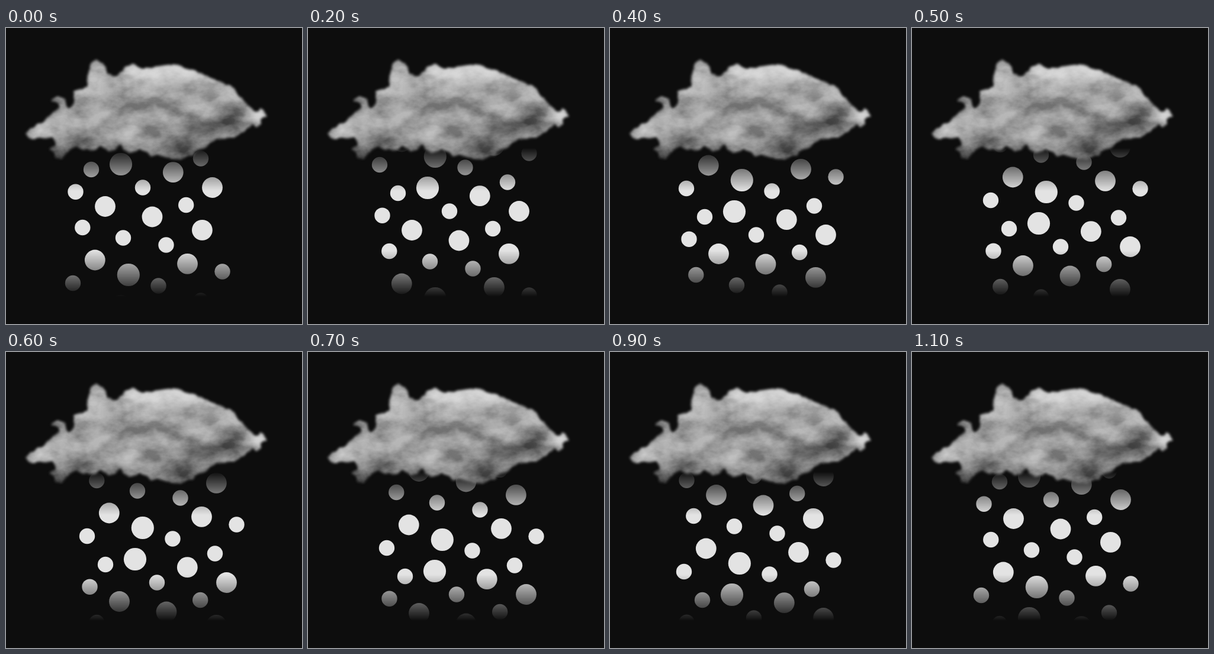
Write an HTML page that moves like this. It is 500x500 px and loops after 1200 ms.

```html
<!DOCTYPE html>
<html lang="en">
<head>
<meta charset="utf-8">
<title>Snow cloud</title>
<style>
  html, body { margin: 0; width: 100%; height: 100%; overflow: hidden; background: #0d0d0d; }
  svg { display: block; width: 100vw; height: 100vh; }
  #drift { animation: drift 1.2s infinite; }
  #fall { animation: fall 1.2s steps(12) infinite; }
  #grain { mix-blend-mode: soft-light; opacity: .6; }
  @keyframes drift {
    0%, 100% { transform: translateX(0); animation-timing-function: steps(6); }
    50% { transform: translateX(24px); animation-timing-function: steps(6); }
  }
  @keyframes fall {
    from { transform: translateY(0); }
    to { transform: translateY(240px); }
  }
</style>
</head>
<body>
<svg viewBox="0 0 500 500">
  <defs>
    <linearGradient id="fade" gradientUnits="userSpaceOnUse" x1="0" y1="202" x2="0" y2="454">
      <stop offset="0" stop-color="#fff" stop-opacity="0"/>
      <stop offset=".29" stop-color="#fff"/>
      <stop offset=".69" stop-color="#fff"/>
      <stop offset="1" stop-color="#fff" stop-opacity="0"/>
    </linearGradient>
    <mask id="window" maskUnits="userSpaceOnUse" x="0" y="200" width="500" height="260" style="mask-type: alpha">
      <rect y="200" width="500" height="260" fill="url(#fade)"/>
    </mask>

    <linearGradient id="body" gradientUnits="userSpaceOnUse" x1="0" y1="55" x2="0" y2="220">
      <stop offset="0" stop-color="#b4b4b4"/>
      <stop offset=".45" stop-color="#a0a0a0"/>
      <stop offset=".75" stop-color="#989898"/>
      <stop offset="1" stop-color="#707070"/>
    </linearGradient>
    <filter id="ragged" filterUnits="userSpaceOnUse" x="0" y="20" width="500" height="230">
      <feTurbulence type="fractalNoise" baseFrequency=".07" numOctaves="2" seed="4"/>
      <feDisplacementMap in="SourceGraphic" scale="7" xChannelSelector="R" yChannelSelector="G"/>
      <feGaussianBlur stdDeviation="2.2"/>
    </filter>
    <filter id="soft" filterUnits="userSpaceOnUse" x="0" y="20" width="500" height="230">
      <feGaussianBlur stdDeviation="9"/>
    </filter>
    <filter id="noise" filterUnits="userSpaceOnUse" x="0" y="20" width="500" height="230" color-interpolation-filters="sRGB">
      <feTurbulence type="fractalNoise" baseFrequency=".022 .035" numOctaves="4" seed="9"/>
      <feColorMatrix values="2 0 0 0 -.5  2 0 0 0 -.5  2 0 0 0 -.5  0 0 0 0 1"/>
    </filter>
    <mask id="outline" maskUnits="userSpaceOnUse" x="0" y="20" width="500" height="230">
      <g filter="url(#ragged)" fill="#fff">
        <path d="M34 179L44 167 62 160 77 144 92 133 105 135 114 129 115 107 139 97 137 80 143 62 154 54 167 63 171 77
          187 81 204 65 215 62 232 70 250 65 283 61 302 68 320 71 335 80 360 90 382 98 392 114 411 131 419 140 426 141
          431 134 442 148 430 154 431 162 424 167 416 163 400 176 384 186 356 187 340 199 321 207 316 215 296 221
          270 219 258 214 246 216 228 206 210 212 200 206 192 195 185 207 174 209 160 199 150 204 132 206 120 200
          106 207 94 221 84 219 82 211 74 206 84 198 80 186 58 185 42 188Z"/>
        <path d="M77 123L88 115 99 121 104 136 90 138 88 127Z"/>
      </g>
    </mask>
  </defs>

  <rect width="500" height="500" fill="#0d0d0d"/>

  <g mask="url(#window)">
    <g id="drift">
      <g id="fall" fill="#e3e3e3">
        <g id="flakes"></g>
        <use href="#flakes" y="-240"/>
        <use href="#flakes" y="240"/>
      </g>
    </g>
  </g>

  <g mask="url(#outline)">
    <rect y="20" width="500" height="230" fill="url(#body)"/>
    <g filter="url(#soft)">
      <g fill="#d2d2d2">
        <ellipse cx="278" cy="76" rx="62" ry="11"/>
        <ellipse cx="213" cy="78" rx="20" ry="12"/>
        <ellipse cx="345" cy="98" rx="30" ry="9" transform="rotate(26 345 98)" opacity=".6"/>
        <ellipse cx="210" cy="190" rx="17" ry="13" opacity=".8"/>
        <ellipse cx="65" cy="172" rx="34" ry="10" opacity=".7"/>
        <ellipse cx="128" cy="118" rx="14" ry="14" opacity=".4"/>
        <ellipse cx="428" cy="147" rx="14" ry="13"/>
      </g>
      <g fill="#484848">
        <ellipse cx="335" cy="168" rx="58" ry="11" transform="rotate(-8 335 168)" opacity=".85"/>
        <ellipse cx="380" cy="148" rx="22" ry="22" opacity=".4"/>
        <ellipse cx="290" cy="208" rx="45" ry="12" opacity=".6"/>
        <ellipse cx="145" cy="200" rx="45" ry="9" opacity=".6"/>
        <ellipse cx="175" cy="101" rx="8" ry="18" opacity=".35"/>
        <ellipse cx="245" cy="138" rx="60" ry="7" transform="rotate(8 245 138)" opacity=".2"/>
      </g>
    </g>
    <rect id="grain" y="20" width="500" height="230" filter="url(#noise)"/>
  </g>
</svg>
<script>
  // Flake centres at the start of the loop, grouped by radius.
  const flakes = {
    13.2: [[144, 239], [329, 220.5], [117.5, 276.7], [231, 269.5], [304.2, 299], [129.3, 337],
           [198, 354.5], [270.5, 366.5], [365.5, 411.5], [113, 431], [257.5, 435.5]],
    17.4: [[282.3, 243.7], [348.5, 269.5], [167.5, 301.5], [247, 319], [331.4, 341.4], [150.3, 392], [306.5, 398.3]],
    19.1: [[194, 230], [206.8, 417]]
  };
  const circles = ([r, spots]) => spots.map(([x, y]) => `<circle cx="${x}" cy="${y}" r="${r}"/>`).join("");
  document.getElementById("flakes").innerHTML = Object.entries(flakes).map(circles).join("");
</script>
</body>
</html>
```
